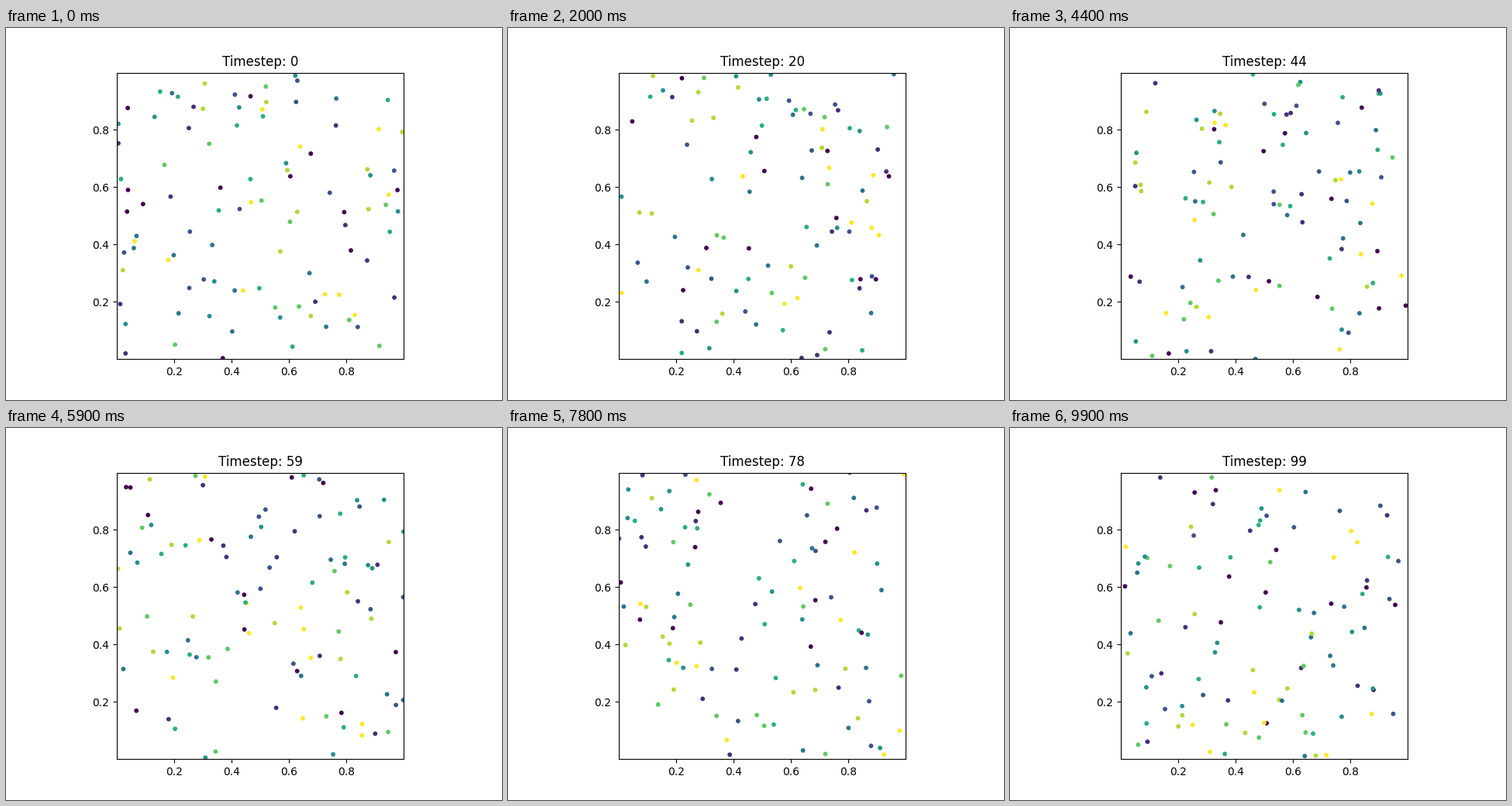
Recreate the animation shown at these times as a matplotlib script. Size 640 by 480 pixels, loop 10 s.

```python
import matplotlib.pyplot as plt
import numpy as np
from matplotlib.animation import FuncAnimation

STEPS = 100
COUNT = 100
KINDS = 9
SPEED = 0.02      # box widths per step
TURN = 0.6        # spread of the heading change per step
LIMITS = (0.0005, 0.9995)   # just inside the box, so 0 and 1 get no tick

rng = np.random.default_rng(7)


def walk(start):
    """Constant-speed wander with drifting headings in a periodic box."""
    n = len(start)
    turns = rng.normal(0, TURN, (STEPS - 1, n))
    heading = rng.uniform(0, 2 * np.pi, n) + np.cumsum(turns, axis=0)
    moves = SPEED * np.stack([np.cos(heading), np.sin(heading)], axis=-1)
    return np.concatenate([start[None], start + np.cumsum(moves, axis=0)]) % 1


paths = walk(rng.random((COUNT, 2)))
kinds = rng.permutation(np.arange(COUNT) % KINDS)

fig, ax = plt.subplots(figsize=(6.4, 4.8), dpi=100)
ax.set(xlim=LIMITS, ylim=LIMITS, aspect="equal")
dots = ax.scatter(*paths[0].T, c=kinds, cmap="viridis", s=10)
title = ax.set_title("Timestep: 0")


def draw(step):
    dots.set_offsets(paths[step])
    title.set_text(f"Timestep: {step}")
    return dots, title


anim = FuncAnimation(fig, draw, frames=STEPS, interval=100,
                     repeat=True, repeat_delay=0)
plt.show()
```
